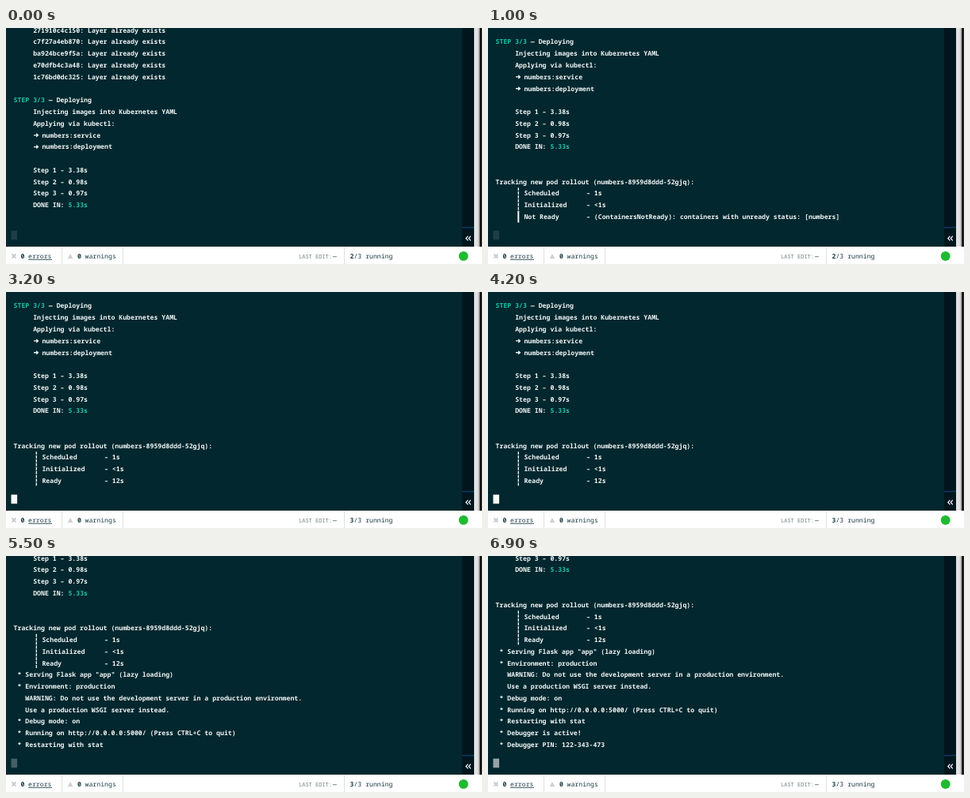
An HTML page that plays this animation: 600 by 299 pixels, repeating every 7000 ms.

```html
<!DOCTYPE html>
<html>
<head>
<meta charset="utf-8">
<style>
html, body { margin: 0; height: 100%; overflow: hidden; background: #02272e; }
svg { display: block; }
text { font: 400 8.2px "Noto Sans Mono", monospace; white-space: pre; text-rendering: geometricPrecision; }
#log text { font-weight: 600; fill: #f2f6f6; }
#log .teal { fill: #22c5aa; }
#log path { fill: none; stroke: #f2f6f6; stroke-width: 1.3; }
#bar text { fill: #1b3c45; }
#bar .b { font-weight: 600; }
#bar .small { font-size: 7px; fill: #6f7f83; }
</style>
</head>
<body>
<svg width="600" height="299" viewBox="0 0 600 299">
  <rect width="600" height="299" fill="#02272e"/>
  <g id="log"></g>
  <rect id="cursor" x="6.5" y="256.7" width="7.6" height="11.5" fill="#fff"/>

  <rect x="575" width="15" height="277" fill="#00161c"/>
  <rect x="575" y="252" width="15" height="1.5" fill="#0a3a66"/>
  <path d="M582.4 263.6l-2.6 2.9 2.6 2.9M585.8 263.6l-2.6 2.9 2.6 2.9" fill="none" stroke="#fff" stroke-width="1.2"/>
  <rect x="590" width="7" height="277" fill="#e2e2e2"/>
  <rect x="595" width="2" height="277" fill="#bdbdbd"/>
  <rect x="597" width="3" height="277" fill="#1c1a1a"/>

  <g id="bar">
    <rect y="277" width="600" height="22" fill="#fff"/>
    <path d="M70.5 277v22M147.5 277v22M426.5 277v22" stroke="#dde1e2"/>
    <path d="M7.5 286.5l5 5m0-5l-5 5" stroke="#c6cccd" stroke-width="1.8"/>
    <text x="18.5" y="292" class="b">0</text>
    <text x="28" y="292">errors</text>
    <path d="M28 293.5h30" stroke="#1b3c45" stroke-width=".8"/>
    <path d="M81 286l3.5 6.3h-7z" fill="#d3cfd2"/>
    <text x="90" y="292" class="b">0</text>
    <text x="99.5" y="292">warnings</text>
    <text x="369" y="292" class="small">LAST EDIT:</text>
    <text x="412" y="292">—</text>
    <text x="433.5" y="292" class="b" id="ready">2</text>
    <text x="438.4" y="292">/3 running</text>
    <circle cx="576.7" cy="289" r="6" fill="#20ba31"/>
  </g>
</svg>
<script>
const LOOP = 7000, ROW = 14.77, LAST_BASELINE = 242, LEFT = 9.6, COL = 4.92;
const INDENT = 45.4, READY_AT = 2900;
const $ = id => document.getElementById(id);

// Each log line: [time it appears, text]. {..} is teal, a leading | is a status row,
// a leading > is an arrow row.
const lines = [
  ...["271910c4c150", "c7f27a4eb870", "ba924bce9f5a", "e70dfb4c3a48", "1c76bd0dc325"]
    .map(id => [0, `     ${id}: Layer already exists`]),
  [0, ""],
  [0, "{STEP 3/3} — Deploying"],
  [0, "     Injecting images into Kubernetes YAML"],
  [0, "     Applying via kubectl:"],
  [0, ">numbers:service"],
  [0, ">numbers:deployment"],
  [0, ""],
  [0, "     Step 1 – 3.38s"],
  [0, "     Step 2 – 0.98s"],
  [0, "     Step 3 – 0.97s"],
  [0, "     DONE IN: {5.33s}"],
  [0, ""],
  [500, ""],
  [500, "Tracking new pod rollout (numbers-8959d8ddd-52gjq):"],
  [500, "|Scheduled       – 1s"],
  [500, "|Initialized     – <1s"],
  [500, "|"],
  [5200, " * Serving Flask app \"app\" (lazy loading)"],
  [5200, " * Environment: production"],
  [5200, "   WARNING: Do not use the development server in a production environment."],
  [5200, "   Use a production WSGI server instead."],
  [5200, " * Debug mode: on"],
  [5200, " * Running on http://0.0.0.0:5000/ (Press CTRL+C to quit)"],
  [5200, " * Restarting with stat"],
  [6000, " * Debugger is active!"],
  [6400, " * Debugger PIN: 122-343-473"],
];
const statusRow = lines.findIndex(([, text]) => text === "|");

function add(parent, tag, attrs, text = "") {
  const el = document.createElementNS("http://www.w3.org/2000/svg", tag);
  for (const key in attrs) el.setAttribute(key, attrs[key]);
  el.textContent = text;
  return parent.appendChild(el);
}

const rows = lines.map(([, text], i) => {
  const row = add($("log"), "g", {}), y = i * ROW;
  if (text[0] === "|" || text[0] === ">") {
    row.mark = add(row, "path", text[0] === "|"
      ? { d: `M38.3 ${y - 10.3}v${ROW}`, "stroke-dasharray": "3.9 1" }
      : { d: `M35 ${y - 2.8}h5.4m-2.2 -2l2.2 2l-2.2 2` });
    row.label = add(row, "text", { x: INDENT, y }, text.slice(1));
    return row;
  }
  let col = text.search(/\S/);
  text.trimStart().split(/[{}]/).forEach((part, k) => {
    if (part) add(row, "text", { x: LEFT + col * COL, y, class: k % 2 ? "teal" : "" }, part);
    col += part.length;
  });
  return row;
});

function draw(now) {
  const t = now % LOOP, ready = t >= READY_AT;
  const shown = lines.filter(([at]) => at <= t).length;
  rows.forEach((row, i) => row.style.display = i < shown ? "" : "none");
  $("log").setAttribute("transform", `translate(0 ${LAST_BASELINE - (shown - 1) * ROW})`);

  const { mark, label } = rows[statusRow];
  label.textContent = ready
    ? "Ready           – 12s"
    : "Not Ready       – (ContainersNotReady): containers with unready status: [numbers]";
  mark.setAttribute("stroke-dasharray", ready ? "3.9 1" : "none");
  mark.style.strokeWidth = ready ? 1.3 : 2;
  $("ready").textContent = ready ? 3 : 2;

  // One-second pulse; its phase jumps where the recording cuts.
  const peak = ready ? 140 : 530;
  const glow = (1 + Math.cos((t - peak) / 1000 * 2 * Math.PI)) / 2;
  $("cursor").setAttribute("opacity", 0.1 + 0.9 * glow);
}

const start = performance.now();
(function tick() {
  draw(performance.now() - start);
  requestAnimationFrame(tick);
})();
</script>
</body>
</html>
```
